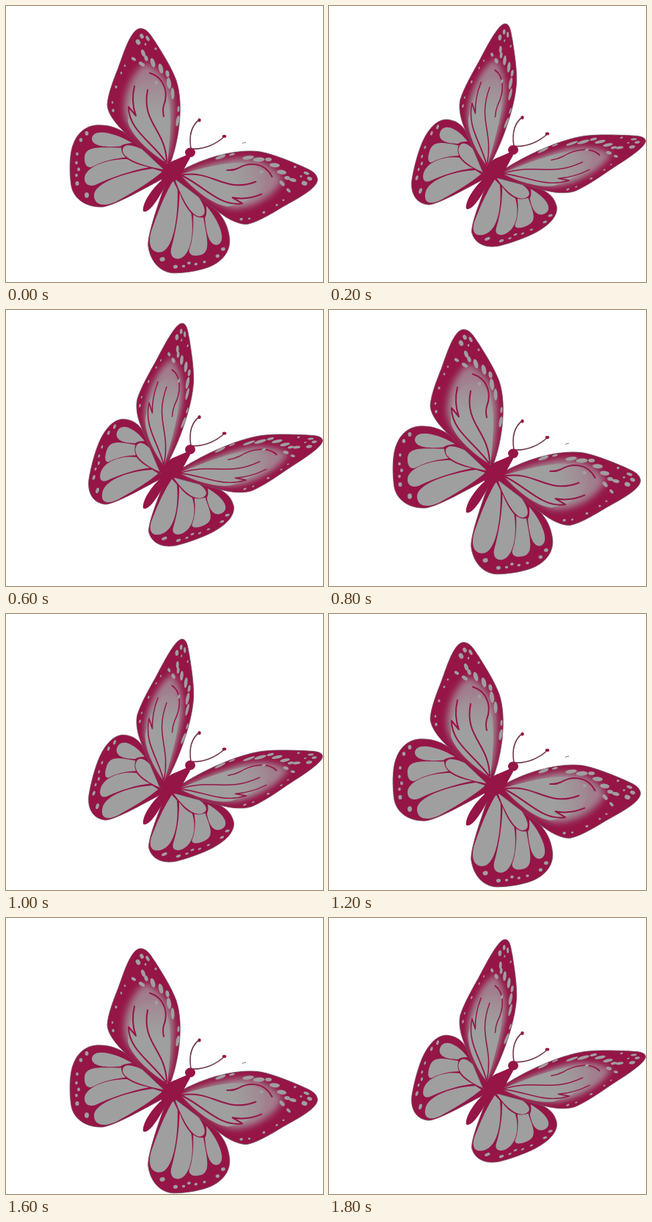
These frames come from a looping animation (432 by 375 pixels, 2000 ms). An HTML page:

```html
<!DOCTYPE html>
<html lang="en">
<head>
<meta charset="utf-8">
<title>Butterfly</title>
<style>
html, body { margin: 0; width: 100%; height: 100%; overflow: hidden; background: #fff; }
svg { display: block; width: 432px; height: 375px; }
.edge { fill: #951547; stroke: #75505f; stroke-width: .8; }
.vein { fill: none; stroke: #951547; stroke-width: 2; stroke-linecap: round; stroke-linejoin: round; }
.cell { fill: #9f9f9f; }
.feeler { fill: none; stroke: #70384c; stroke-width: 1.6; }
</style>
</head>
<body>
<svg viewBox="0 0 432 375">
  <defs>
    <filter id="soft" x="-30%" y="-30%" width="160%" height="160%"><feGaussianBlur stdDeviation="5"/></filter>
    <linearGradient id="fade" gradientUnits="userSpaceOnUse" x1="0" y1="95" x2="0" y2="150">
      <stop offset="0" stop-color="#9f9f9f" stop-opacity="0"/>
      <stop offset="1" stop-color="#9f9f9f"/>
    </linearGradient>
    <linearGradient id="mauve" gradientUnits="userSpaceOnUse" x1="0" y1="78" x2="0" y2="165">
      <stop offset="0" stop-color="#a2778a"/>
      <stop offset="1" stop-color="#9f979a"/>
    </linearGradient>
    <path id="fore" d="M183 30.5C193 30 199 43 203 48C211 61 225 82 232 101C243 134 236 189 219 226C200 208 171 181 156 166C146 156 138 143 138 134C139 119 147 99 153 84C160 65 170 31 183 30.5Z"/>
    <clipPath id="clip"><use href="#fore"/></clipPath>
    <g id="wing">
      <path class="edge" d="M221 222C205 208 186 190 170 178C154 165 139 161 122 162C104 164 93 178 89 197C86 213 87 232 89 245C93 263 110 274 132 273C150 270 185 250 222 230Z"/>
      <g class="cell">
        <path d="M159 195C160 186 174 188 190 197C203 206 213 214 219 223C200 220 157 210 159 195Z"/>
        <path d="M117 181C117 166 145 170 172 186Q159 187 156 190.500C140 192 119 192 117 181Z"/>
        <path d="M107 207C107 190 125 192 157 192.500Q157 200 163 205.500Q134 209 116 219C109 220 107 213 107 207Z"/>
        <path d="M107 234C108 218 138 208 165 208Q178 216 195 219C170 224 145 232 122 243C113 246 107 242 107 234Z"/>
        <path d="M120 259C118 240 164 226 200 221L213 225Q192 243 155 263C140 272 122 274 120 259Z"/>
      </g>
      <use href="#fore" class="edge"/>
      <g clip-path="url(#clip)">
        <g id="inner">
          <path fill="url(#mauve)" filter="url(#soft)" d="M190 78C207 82 226 106 228 135Q228 177 220 207C200 196 173 175 164 154C156 132 168 91 190 78Z"/>
          <path fill="url(#fade)" d="M167 140C172 120 180 101 200 100C227 108 227 150 220 214C200 202 171 178 166 157Z"/>
          <path class="vein" d="M196 91C218 98 221 120 215 135Q213 142 215 150M193 114C184 159 218 168 219 212M175 109Q170 130 177 149L167 137C167 168 198 184 218 212"/>
        </g>
      </g>
      <g class="cell" id="spots"></g>
    </g>
  </defs>
  <rect width="432" height="375" fill="#fff"/>
  <g id="all">
    <g id="left"><use href="#wing"/></g>
    <g id="right"><use href="#wing" id="mirror"/></g>
    <g id="body">
      <path class="feeler" d="M252 194C249 176 253 162 264 154M254 194C270 195 286 188 298 177"/>
      <g fill="#951547">
        <path d="M187 279C185 268 200 247 212 237C207 225 220 213 231 209L245 203C248 200 253 204 250 208Q242 222 238 231C232 239 222 239 217 244C209 260 195 283 187 279Z"/>
        <ellipse cx="251" cy="199" rx="7" ry="6.500"/>
        <ellipse cx="263.500" cy="155" rx="2.200" ry="2.500"/>
        <ellipse cx="297.500" cy="177" rx="2.800" ry="2"/>
      </g>
    </g>
    <path id="speck" d="M322 186.500L327 185" stroke="#777" stroke-width="1"/>
  </g>
</svg>
<script>
const $ = id => document.getElementById(id);
const put = (id, m) => $(id).setAttribute('transform', m);

// long spots: x, y, rx, ry; wide ones lean right, the rest turn along the rim
const ovals = [
  [180, 49, 3, 4], [185, 41, 2.5, 3.5], [193, 44, 2, 4], [187, 64, 2.5, 5],
  [191, 71, 2.5, 4], [174, 72, 3.5, 2], [185, 79, 4.5, 2.5], [200, 77, 3, 6.5],
  [211, 85, 3, 7], [220, 92, 2.5, 4.5], [222, 105, 3, 8], [227, 119, 2.5, 8],
  [235, 140, 1.5, 4], [234, 156, 2.3, 7.5]
];
// small dots: x, y, r
const dots = [
  [190, 52, 1.5], [204, 58, 1.7], [205, 104, 2.5], [162, 81, 1.4], [157, 91, 1.5],
  [150, 110, 1.8], [145, 131, 1.5], [146, 142, 2], [110, 173, 2.7], [102, 182, 2.5],
  [97, 201, 2], [96, 213, 2], [99, 222, 2.2], [96, 230, 2], [97, 241, 2.8], [110, 257, 3.3]
];
const oval = (x, y, rx, ry, tilt) =>
  `<ellipse cx="${x}" cy="${y}" rx="${rx}" ry="${ry}" transform="rotate(${tilt} ${x} ${y})"/>`;
$('spots').innerHTML =
  ovals.map(([x, y, rx, ry]) => oval(x, y, rx, ry, rx > ry ? 32 : (y - 125) * .35)).join('') +
  dots.map(([x, y, r]) => oval(x, y, r * .9, r * 1.1, 0)).join('');

put('mirror', 'matrix(-.164 -.986 -.986 .165 484.5 410.2)');

// height of each 200 ms step; odd steps have the wings drawn up
const lift = [0, 0, -8, -6, -4, 10, 8, 17, 11, 5];
const raised = {
  left: 'matrix(.718 .0985 -.279 1.035 117.3 -25.5)',
  right: 'matrix(1.045 -.262 .049 .718 -23.7 125.1)',
  inner: 'matrix(1 0 .073 1 -15.6 0)',
  body: 'translate(0 -3.5)'
};

function draw(ms) {
  const step = Math.floor(ms % 2000 / 200);
  const up = step % 2 === 1;
  put('all', `translate(0 ${lift[step]})`);
  for (const id in raised) put(id, up ? raised[id] : 'translate(0 0)');
  $('speck').setAttribute('opacity', up ? 0 : 1);
}

const start = performance.now();
function tick(now) {
  draw(Math.max(0, now - start));
  requestAnimationFrame(tick);
}
draw(0);
requestAnimationFrame(tick);
</script>
</body>
</html>
```
